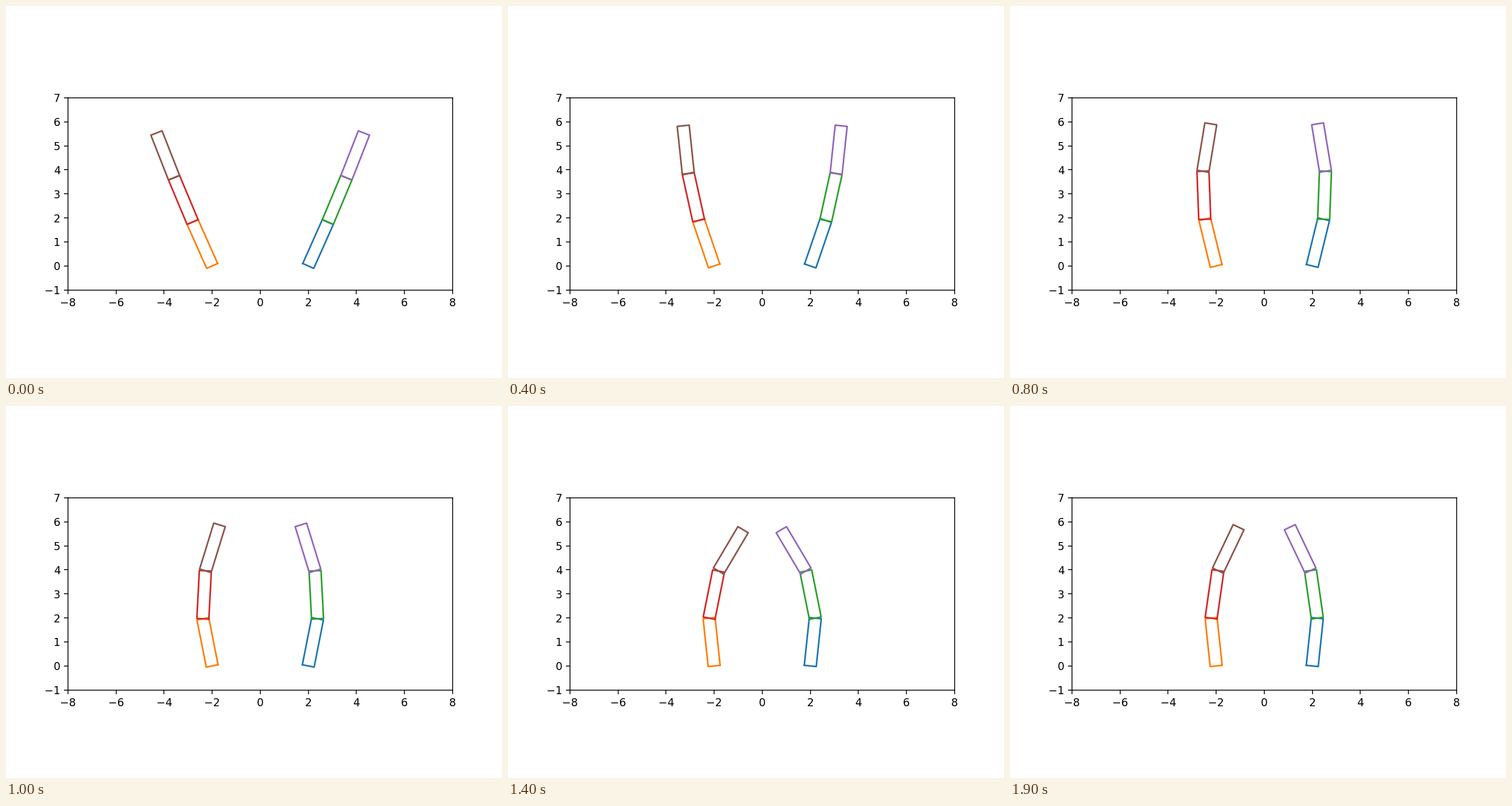
A matplotlib script for the animation above (2 s loop, 864x648 px).

```python
import numpy as np
import matplotlib.pyplot as plt
from matplotlib.animation import FuncAnimation

FRAMES, INTERVAL = 20, 100
LENGTH, WIDTH = 2.0, 0.5
STEP = 18 / 14          # degrees each joint closes per frame
START = 25.3            # lean of the lowest link before closing


def joint_angles(i):
    """Relative angles in degrees: the grip closes, then the upper joints relax."""
    n = i + 1
    low = min(n, 15)
    mid = n if n <= 14 else 14 - (n - 14) / 2
    top = n if n <= 15 else 15.5 - (n - 16) / 2
    return START - STEP * low, -STEP * mid, -STEP * top


def link_outline(base, lean):
    along = np.array([np.sin(lean), np.cos(lean)])
    across = np.array([np.cos(lean), -np.sin(lean)]) * WIDTH / 2
    tip = base + LENGTH * along
    corners = [base - across, base + across, tip + across, tip - across,
               base - across]
    return np.array(corners), tip


fig, ax = plt.subplots(figsize=(6.4, 4.8), dpi=135)
ax.set_aspect("equal")
ax.set_xlim(-8, 8)
ax.set_ylim(-1, 7)
ax.set_xticks(range(-8, 9, 2))
ax.set_yticks(range(-1, 8))

# One (right, left) pair of outlines per link, in colour-cycle order
pairs = [[ax.plot([], [], color=f"C{2 * k + s}", lw=1.5)[0] for s in range(2)]
         for k in range(3)]


def draw(i):
    base = np.array([2.0, 0.0])
    leans = np.radians(np.cumsum(joint_angles(i)))
    for (right, left), lean in zip(pairs, leans):
        outline, base = link_outline(base, lean)
        right.set_data(outline[:, 0], outline[:, 1])
        left.set_data(-outline[:, 0], outline[:, 1])
    return [line for pair in pairs for line in pair]


anim = FuncAnimation(fig, draw, frames=FRAMES, interval=INTERVAL,
                     init_func=lambda: draw(0), repeat=True, repeat_delay=0)
plt.show()
```
